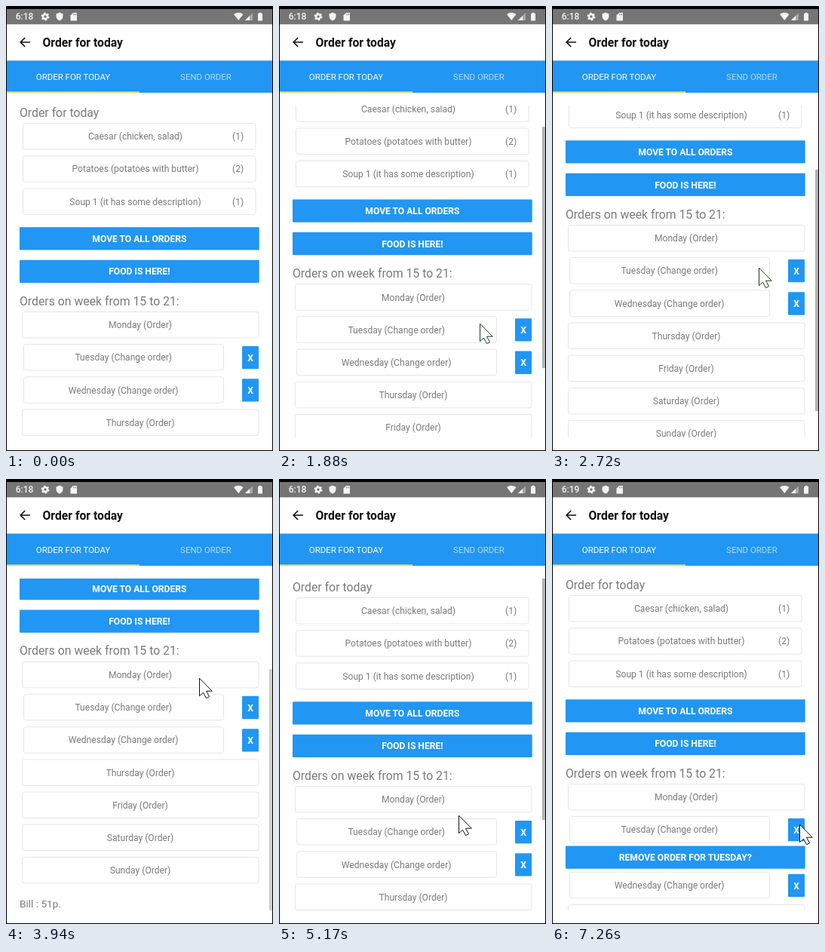
Recreate the animation shown at these times as an HTML page. Size 354 px wide and 590 px high, loop 8 s.

```html
<!DOCTYPE html>
<html lang="en">
<head>
<meta charset="utf-8">
<title>Order for today</title>
<style>
  html, body { margin: 0; width: 100%; height: 100%; overflow: hidden; background: #000; }
  svg { display: block; font-family: Roboto, sans-serif; }
</style>
</head>
<body>
<svg width="354" height="590" viewBox="0 0 354 590">
  <defs><clipPath id="view"><rect x="1" y="132" width="352" height="440"/></clipPath></defs>
  <rect x="1" y="4" width="352" height="585" fill="#fff"/>
  <rect x="1" y="4" width="352" height="20.3" fill="#757575"/>
  <g fill="#f4f4f4">
    <g fill="none" stroke="#f4f4f4">
      <circle cx="52" cy="14" r="3" stroke-width="2.6"/>
      <circle cx="52" cy="14" r="4.7" stroke-width="1.6" stroke-dasharray="2.4 2.52"/>
    </g>
    <path d="M71 8.6l4.5 2v3.2c0 2.6-1.8 4.8-4.5 5.7c-2.7-.9-4.5-3.1-4.5-5.7v-3.2z"/>
    <path d="M89 9h5v10.5h-8.5v-7z"/>
    <path d="M89.5 10.3v2M91.3 10.3v2M93 10.3v2" stroke="#757575" stroke-width=".8"/>
    <path d="M302 11q6-4.5 12.5 0l-6.2 8z"/>
    <path d="M327 9v10h-10z" opacity=".4"/>
    <path d="M323 13v6h-6z"/>
    <path d="M334 10h1.5v-1.2h3v1.2h1.5v9.5h-6z"/>
  </g>
  <path d="M32 48H19.5M25.2 42l-6 6 6 6" fill="none" stroke="#111" stroke-width="1.7"/>
  <rect x="1" y="72.4" width="352" height="42.6" fill="#2196f3"/>
  <rect x="1" y="113.4" width="176" height="2" fill="#e3df6c"/>
  <g id="labels"></g>
  <g clip-path="url(#view)">
    <g id="content"></g>
    <rect id="bar" x="349" width="4" height="320" fill="#b3b3b3"/>
  </g>
  <path id="cursor" d="M.5 .2V23.7l5-4.5 4 7.5 4-2-4-7.5h7.8z" fill="#fff" stroke-linejoin="round"/>
</svg>
<script>
const $ = id => document.getElementById(id);
const LOOP = 8000, STEP = 76.75, START = 340;
const BLUE = '#2196f3', GREY = '#7a7a7a', LIGHT = '#f4f4f4';

// y is the middle of the capitals
const label = (str, x, y, size = 12.1, fill = GREY, anchor = 'middle', weight = 400) =>
  `<text x="${x}" y="${y + size * .355}" font-size="${size}" fill="${fill}" text-anchor="${anchor}" font-weight="${weight}">${str}</text>`;
const card = (x, y, w) =>
  `<rect x="${x}" y="${y}" width="${w}" height="34.5" rx="3" fill="#fff" stroke="#e5e5e5"/>`;
const button = (str, x, y, w) =>
  `<rect x="${x}" y="${y}" width="${w}" height="30.3" rx="1" fill="${BLUE}"/>` +
  label(str, x + w / 2, y + 15.5, 12.1, '#fff', 'middle', 700);
const dish = (name, count, y) =>
  card(22.5, y - 17.5, 308.5) + label(name, 171.5, y) + label(`(${count})`, 307.7, y);
const day = (name, y) => card(21.5, y - 17.5, 313.5) + label(name + ' (Order)', 178, y);
const orderedDay = (name, y, id) =>
  card(23.5, y - 17.5, 265) + label(name + ' (Change order)', 155.7, y) +
  `<g id="${id}">${button('X', 313, y - 15, 22)}</g>`;

$('labels').innerHTML =
  `<g id="early">${label('6:18', 12.8, 14.2, 12, LIGHT, 'start', 500)}</g>` +
  `<g id="late">${label('6:19', 12.8, 14.2, 12, LIGHT, 'start', 500)}</g>` +
  label('Order for today', 48.5, 48.5, 15.7, '#111', 'start', 700) +
  label('ORDER FOR TODAY', 89, 94, 11.45, '#fff') +
  label('SEND ORDER', 265, 94, 11.45, '#b5dbfb');

$('content').innerHTML =
  label('Order for today', 18, 143, 15.8, GREY, 'start') +
  dish('Caesar (chicken, salad)', 1, 175) +
  dish('Potatoes (potatoes with butter)', 2, 218.2) +
  dish('Soup 1 (it has some description)', 1, 261.5) +
  button('MOVE TO ALL ORDERS', 18, 295.2, 317.7) +
  button('FOOD IS HERE!', 18, 338.7, 317.7) +
  label('Orders on week from 15 to 21:', 18, 393, 15.8, GREY, 'start') +
  day('Monday', 425) +
  orderedDay('Tuesday', 468, 'removeTue') +
  `<g id="confirm">${button('REMOVE ORDER FOR TUESDAY?', 18, 489.5, 317.7)}</g><g id="rest">` +
  orderedDay('Wednesday', 511.3, 'removeWed') +
  ['Thursday', 'Friday', 'Saturday', 'Sunday'].map((d, i) => day(d, 554.5 + i * 43.15)).join('') +
  label('Bill : 51p.', 18, 728, 13.6, GREY, 'start') + '</g>';

// Keys: [time, ...values], linear in between
const scrollKeys = [[1300, 2], [1880, 39], [2720, 117], [3190, 165.6], [3940, 165.6],
  [4250, 146], [4560, 106], [4870, 50], [5170, 0], [5630, 0], [5780, 3]];
const cursorKeys = [[340, 280, 580], [880, 265, 470], [1260, 265, 470], [1880, 266, 421],
  [2720, 274, 347], [3480, 256, 263], [3940, 256, 263], [4250, 252, 288], [4560, 248, 328],
  [5170, 238, 446], [5560, 236, 474], [6170, 326, 457], [7040, 326, 457], [7250, 328, 458]];
const barKeys = [[3860, 1], [3940, .6], [4016, 1]];
const pressKeys = [[6400, 1], [6480, .6], [6560, .6], [6710, 1]];

function at(keys, t) {
  const i = keys.findIndex(k => k[0] > t);
  if (i < 0) return keys[keys.length - 1].slice(1);
  if (i === 0) return keys[0].slice(1);
  const a = keys[i - 1], b = keys[i], f = (t - a[0]) / (b[0] - a[0]);
  return a.slice(1).map((v, j) => v + (b[j + 1] - v) * f);
}
const between = (t, a, b) => t >= a && t < b;
const show = (id, on) => $(id).setAttribute('visibility', on ? 'visible' : 'hidden');
const move = (id, x, y) => $(id).setAttribute('transform', `translate(${x} ${y})`);

function draw(now) {
  const time = now % LOOP;
  const t = time < START ? 0 : START + Math.floor((time - START + 8) / STEP) * STEP;
  const [scroll] = at(scrollKeys, t);
  const [x, y] = at(cursorKeys, t);
  const asking = t >= 6550;

  move('content', 0, -scroll);
  move('rest', 0, asking ? 30.5 : 0);
  $('bar').setAttribute('y', 132 + scroll * 120 / 165);
  $('bar').setAttribute('opacity', at(barKeys, t)[0]);
  show('bar', between(t, 1255, 6320));
  show('confirm', asking);
  show('early', t < 5900);
  show('late', t >= 5900);
  $('removeTue').setAttribute('opacity', at(pressKeys, t)[0]);

  show('cursor', t >= START);
  move('cursor', Math.round(x), Math.round(y));
  const pressed = between(t, 1020, 3400) || between(t, 4000, 5000);
  $('cursor').setAttribute('stroke', pressed ? '#173f1e' : '#111');
}

function loop() {
  draw(performance.now());
  requestAnimationFrame(loop);
}
loop();
</script>
</body>
</html>
```
